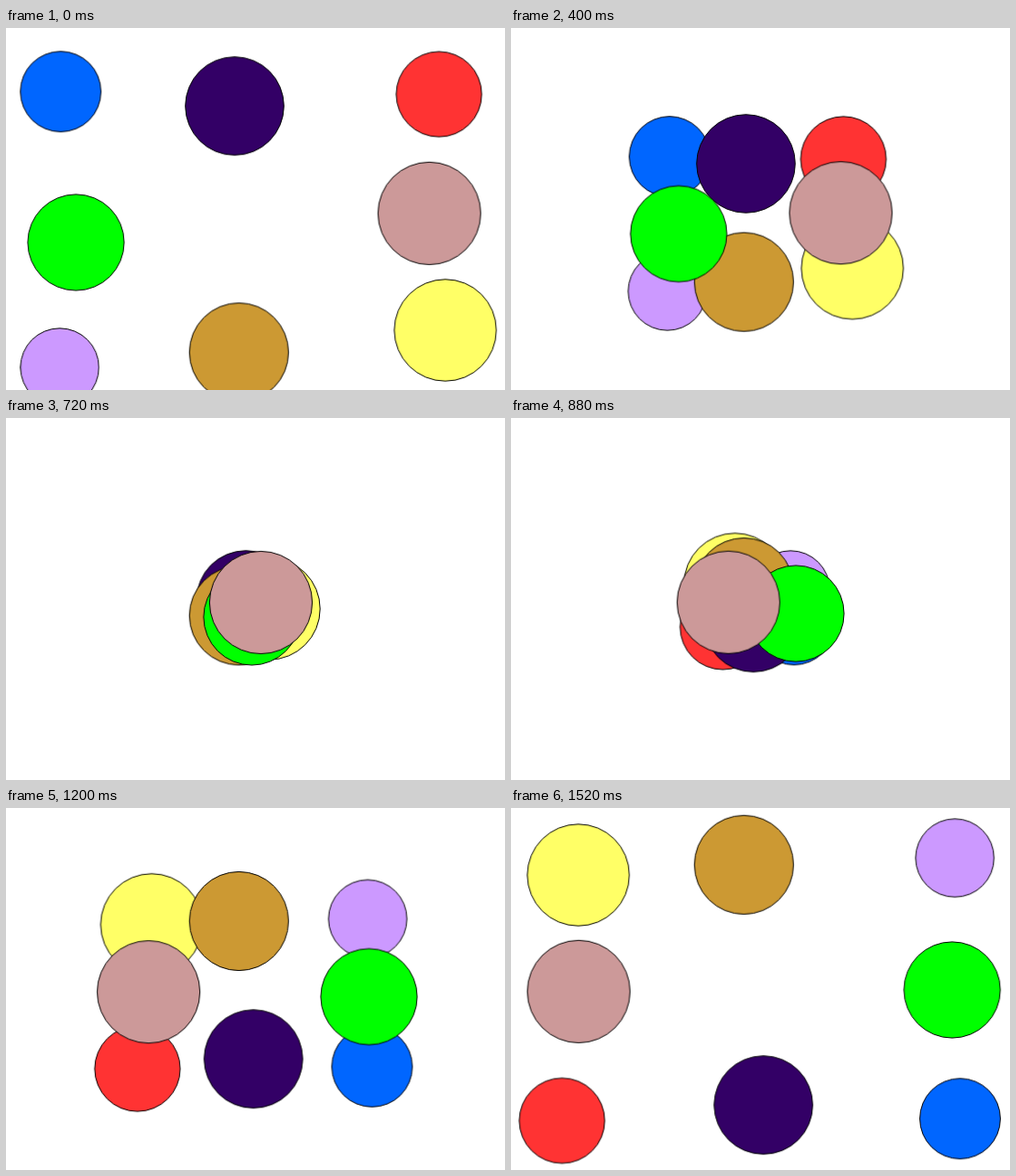
An HTML page for the animation above (1600 ms loop, 550x400 px).

```html
<!DOCTYPE html>
<html lang="en">
<head>
<meta charset="utf-8">
<title>Crossing circles</title>
<style>
  html, body { margin: 0; width: 100%; height: 100%; overflow: hidden; background: #fff; }
  svg { display: block; width: 550px; height: 400px; }
  circle {
    stroke: #000;
    stroke-width: 1;
    animation: cross 1600ms steps(20, jump-none) infinite;
  }
  @keyframes cross {
    from { transform: translate(var(--x0), var(--y0)); }
    to { transform: translate(var(--x1), var(--y1)); }
  }
</style>
</head>
<body>
<!-- Back to front: corners, then middle column, then sides -->
<svg viewBox="0 0 550 400">
  <circle r="44.4" fill="#06f" style="--x0:60.3px; --y0:70.3px; --x1:495px; --y1:343.3px"/>
  <circle r="47.1" fill="#f33" style="--x0:477.2px; --y0:73.2px; --x1:56.2px; --y1:345.5px"/>
  <circle r="43.2" fill="#c9f" style="--x0:59.2px; --y0:375px; --x1:489.2px; --y1:55.2px"/>
  <circle r="56.2" fill="#ff6" style="--x0:484.2px; --y0:333.9px; --x1:74.2px; --y1:74.1px"/>
  <circle r="54.3" fill="#306" style="--x0:252px; --y0:86.2px; --x1:278.2px; --y1:328.2px"/>
  <circle r="54.6" fill="#c93" style="--x0:256.7px; --y0:358.4px; --x1:256.7px; --y1:62.7px"/>
  <circle r="53.1" fill="#0f0" style="--x0:77.1px; --y0:236.9px; --x1:486.2px; --y1:201px"/>
  <circle r="56.6" fill="#c99" style="--x0:466.6px; --y0:204.8px; --x1:74.6px; --y1:202.8px"/>
</svg>
</body>
</html>
```
